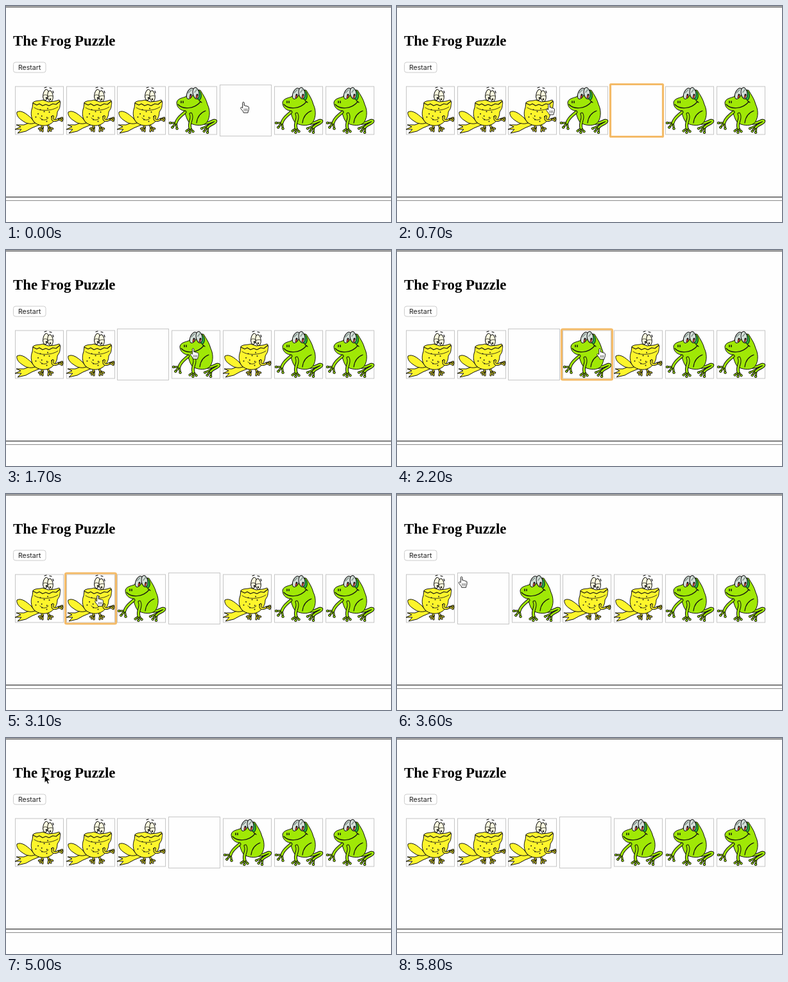
An HTML page that plays this animation: 600 by 338 pixels, repeating every 5.9 s.

```html
<!DOCTYPE html>
<html lang="en">
<head>
<meta charset="utf-8">
<title>The Frog Puzzle</title>
<style>
html, body { margin: 0; width: 100%; height: 100%; overflow: hidden; background: #fefefe; }
svg { display: block; width: 600px; height: 338px; }
text { cursor: default; }
.title { font: bold 22.85px "Liberation Serif", "Times New Roman", serif; }
.label { font: 10.6px Inter, Roboto, sans-serif; fill: #222; }
.ink { fill: none; stroke: #111; stroke-linecap: round; stroke-linejoin: round; }
.shape { stroke: #111; stroke-linejoin: round; }
.cell { fill: #fefefe; stroke: #c6c6c6; }
.ring { fill: none; stroke: #f4bb68; stroke-width: 3.2; }
</style>
</head>
<body>
<svg viewBox="0 0 600 338">
  <defs>
    <g id="Y"></g>
    <g id="G"></g>
  </defs>
  <path d="M0 1.5H600M0 299H600" stroke="#555" stroke-width="1.4"/>
  <path d="M0 304.5H600" stroke="#8a8a8a"/>
  <text class="title" x="11" y="62">The Frog Puzzle</text>
  <rect x="11.5" y="88" width="50.5" height="16" rx="3.5" fill="#fff" stroke="#ccc"/>
  <text class="label" x="18.9" y="100">Restart</text>
  <g id="board"></g>
  <g id="hand">
    <path d="M-1.3 9V1C-1.3-.6 1.2-.6 1.2 1V5.4C2 4.6 3.6 5 3.7 6.4C4.2 5.4 6 5.7 6 7C6.7 6.2 8.4 6.6 8.4 8.2V11C8.4 13 7 14 7 16.5H.2C0 14.5-2 13-4 10C-5 8.2-3.2 7-1.3 9Z"
      fill="#fff" stroke="#222" stroke-linejoin="round"/>
    <path d="M1.2 10V14M3.5 10V14M5.7 10V14" stroke="#333" stroke-width=".8"/>
  </g>
  <path id="arrow" d="M0 0V12.5L2.9 9.8L5 14.4L7.2 13.4L5.2 9H9.2Z" fill="#000" stroke="#fff"/>
</svg>
<script>
const el = id => document.getElementById(id);
const line = (d, width = 1, color = "#111") =>
  `<path class="ink" d="${d}" style="stroke:${color}" stroke-width="${width}"/>`;
const limb = (color, width, d) => line(d, width + 2) + line(d, width, color);
const shape = (fill, d) => `<path class="shape" fill="${fill}" d="${d}"/>`;
const oval = (fill, x, y, rx, ry, turn = 0) =>
  `<ellipse class="shape" fill="${fill}" cx="${x}" cy="${y}" rx="${rx}" ry="${ry}" transform="rotate(${turn} ${x} ${y})"/>`;
const dot = (x, y, r) => `<circle cx="${x}" cy="${y}" r="${r}" fill="#222"/>`;

// Three toes spread around a direction in degrees, with round tips of radius r.
function foot(color, x, y, angle, spread, length, r) {
  const tips = [-1, 0, 1].map(k => {
    const a = (angle + k * spread) * Math.PI / 180;
    return [x + length * Math.cos(a), y + length * Math.sin(a)];
  });
  return tips.map(([a, b]) => limb(color, 1.2, `M${x} ${y}L${a} ${b}`)).join("") +
    (r ? tips.map(([a, b]) => oval(color, a, b, r, r * .9)).join("") : "");
}

// Spots on a sunflower spiral around the belly.
function spots(count) {
  let out = "";
  for (let i = 1; i <= count; i++) {
    const a = i * 2.4, r = Math.sqrt(i / count);
    out += dot(45 + 15 * r * Math.cos(a), 44 + 11 * r * Math.sin(a), 1);
  }
  return out;
}

function yellowFrog() {
  const c = "#fdf52c";
  return shape(c, "M27 55L14 60L2 60L9 63L0 67L10 67L4 73L17 70L26 65L38 60Z") +
    shape(c, "M3 40C10 36 18 43 25 49L31 57C23 60 16 57 11 53C6 50 2 45 3 40Z") +
    foot(c, 43, 64, 125, 35, 6, 0) + foot(c, 53, 64, 60, 40, 6, 0) +
    limb(c, 1.3, "M41 58L43 64M50 58L53 64") +
    shape(c, "M28 25C33 21 39 23 43 21L52 24L62 23L69 21C72 25 70 28 70 31C70 35 67 37 66 40C66 49 60 57 52 60C43 63 32 60 28 53C24 46 25 38 27 33Z") +
    line("M28 26L34 29L38 27L43 30L48 28L53 30L59 27L64 28L70 23", 1.1) +
    line("M30 33C38 39 57 39 67 32", .8) +
    line("M39 49C43 54 49 53 52 49", .8) +
    limb(c, 1.8, "M59 47C57 52 60 54 64 53L69 51") +
    foot(c, 69, 51, 5, 28, 5, 0) +
    spots(11) +
    oval("#fffde0", 48, 13, 4.2, 8.5, 10) + oval("#fffde0", 55, 15, 4.2, 8.5, -6) +
    line("M44 14C47 12 49 13 52 15M51 16C54 14 57 14 59 15", .8) +
    dot(49, 18, 1.4) + dot(55, 20, 1.4) +
    line("M46 2L49 1M54 2L57 3M59 7L60 10", 1.2);
}

function greenFrog() {
  const c = "#a0e806";
  return foot(c, 62, 61, 125, 30, 11, 1.8) +
    limb(c, 2.6, "M54 57C64 60 71 50 74 54C74 58 66 58 61 64") +
    shape(c, "M13 25C14 19 21 18 27 16C32 8 42 3 50 6C55 14 59 20 61 28C66 38 65 52 58 58C50 63 39 60 33 57C28 51 27 44 25 38C18 37 13 32 13 25Z") +
    foot(c, 12, 57, 130, 50, 9, 1.8) +
    limb(c, 3, "M26 40C20 46 14 49 12 57") +
    foot(c, 34, 65, 95, 45, 7, 1.8) +
    limb(c, 3, "M35 43C39 51 31 56 34 65") +
    line("M15 28C22 36 40 36 50 24M48 22L52 25", 1.2) +
    line("M58 38C50 41 45 48 44 57", 1.2) +
    line("M20 23V25.5M23 23V25.5", 1.5) +
    shape("#26b33f", "M45 6C52 6 53 17 49 21C44 21 42 16 45 6Z") +
    oval("#d5dfda", 34, 11, 4.8, 9, 24) + oval("#d5dfda", 43, 10.5, 4.8, 9, -10) +
    line("M31 10L36 5M41 9L45 4", 1.6, "#83958d") +
    [34, 44].map(x => line(`M${x} 17L${x + 1} 13`, 3) + line(`M${x} 17L${x + .5} 14.5`, 1.7, "#d8452e")).join("");
}

el("Y").innerHTML = yellowFrog();
el("G").innerHTML = greenFrog();

const LOOP = 5900, TICK = 100, RESTART = 4400;
// A frog jumps between the clicked slot and the gap; the slot's ring is lit from on to off.
const moves = [
  { slot: 4, jump: 0, on: 200, off: 1000 },
  { slot: 2, jump: 1000 },
  { slot: 3, jump: 2500, on: 2000, off: 2600 },
  { slot: 1, jump: 3200, on: 2900, off: 3300 }
];
const hops = [
  { start: 100, end: 700, x: 237, y: 153.5 },
  { start: 1300, end: 2200, x: 316, y: 154.5 },
  { start: 2500, end: 3000, x: 143, y: 159 },
  { start: 3400, end: 4200, x: 46, y: 92 },
  { start: 4900, end: 5500, x: 92, y: -20 }
];

function rowAt(t) {
  const row = [..."YYY_GGG"];
  if (t < RESTART) for (const { slot, jump } of moves) {
    if (t < jump) break;
    row[row.indexOf("_")] = row[slot];
    row[slot] = "_";
  }
  return row;
}

function pointer(t) {
  let x = 370, y = 150.5;
  for (const hop of hops) {
    const p = Math.min(1, Math.max(0, (t - hop.start) / (hop.end - hop.start)));
    const eased = 1 - (1 - p) ** 2;
    x += (hop.x - x) * eased;
    y += (hop.y - y) * eased;
  }
  return [x, y];
}

function drawBoard(row, lit) {
  const gap = row.indexOf("_");
  el("board").innerHTML = row.map((kind, i) => {
    const x = Math.round(14 + 79.7 * i + (i > gap ? 5.3 : 0));
    const empty = kind === "_";
    const y = empty ? 123.5 : 126, size = empty ? 80 : 75;
    const box = (cls, d) =>
      `<rect class="${cls}" x="${x + .5 - d}" y="${y - d}" width="${size + 2 * d}" height="${size + 2 * d}" rx="${d}"/>`;
    return box("cell", 0) + (empty ? "" : `<use href="#${kind}" x="${x}" y="126"/>`) +
      (i === lit ? box("ring", empty ? 1 : 2) : "");
  }).join("");
}

const start = performance.now();
let shown = "";
function frame() {
  const t = Math.floor((performance.now() - start) % LOOP / TICK) * TICK;
  const row = rowAt(t), lit = moves.find(m => t >= m.on && t < m.off)?.slot;
  const state = row.join("") + lit;
  if (shown !== state) drawBoard(row, lit);
  shown = state;
  const [x, y] = pointer(t), onCells = y > 122;
  for (const id of ["hand", "arrow"]) {
    el(id).setAttribute("transform", `translate(${x} ${y})`);
    el(id).style.display = (id === "hand") === onCells ? "" : "none";
  }
  requestAnimationFrame(frame);
}
frame();
</script>
</body>
</html>
```
